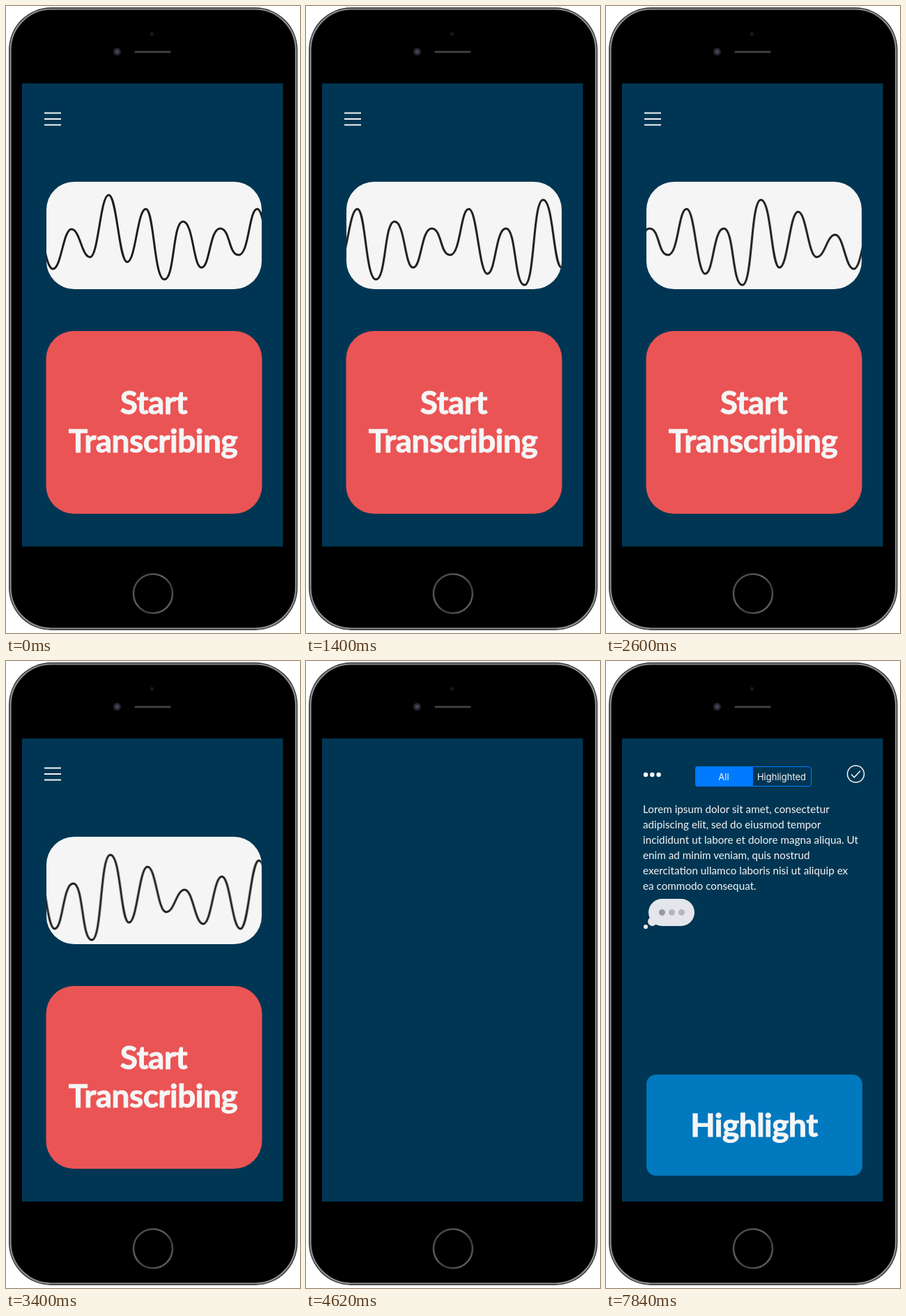
Write an HTML page that moves like this. It is 422 px wide and 899 px high and loops after 8000 ms.

```html
<!DOCTYPE html>
<html lang="en">
<head>
<meta charset="utf-8">
<title>Transcription app</title>
<style>
  html, body { margin: 0; width: 100%; height: 100%; overflow: hidden; background: #fff; }
  svg { display: block; }
  text { fill: #f5f5f5; }
  .label {
    font: 700 46px Lato, "Open Sans", sans-serif; letter-spacing: -.5px; text-anchor: middle;
    stroke: #f5f5f5; stroke-width: 1px;
  }
  .body { font: 15.25px Lato, "Open Sans", sans-serif; }
  .tab { font: 13px Inter, Roboto, sans-serif; text-anchor: middle; }

  .home, .notes, .wave, .more, .bubble { animation: 8s -2ms infinite; }
  .home { animation-name: leave; }
  .notes { animation-name: enter; }
  .wave { animation-name: scroll; }
  .more { animation-name: reveal; animation-timing-function: step-end; }
  .bubble { animation-name: drop; animation-timing-function: step-end; }

  @keyframes leave {
    0% { opacity: 1; }
    47.5% { opacity: 1; animation-timing-function: steps(5, end); }
    53.75%, 100% { opacity: 0; }
  }
  @keyframes enter {
    0% { opacity: 0; }
    60.125% { opacity: 0; animation-timing-function: steps(5, end); }
    66.375%, 100% { opacity: 1; }
  }
  /* one step per 100 ms, with a skipped step at 2 s */
  @keyframes scroll {
    0% { transform: translateX(0); animation-timing-function: steps(20, end); }
    24.9999% { transform: translateX(-181.4px); }
    25% { transform: translateX(-190.5px); animation-timing-function: steps(25, end); }
    56.25%, 100% { transform: translateX(-417.2px); }
  }
  @keyframes reveal {
    0% { fill-opacity: 0; }
    93.875%, 100% { fill-opacity: 1; }
  }
  @keyframes drop {
    0% { transform: translateY(0); }
    93.875%, 100% { transform: translateY(64px); }
  }
</style>
</head>
<body>
<svg width="422" height="899" viewBox="0 0 422 899">
  <defs>
    <clipPath id="card"><rect x="58" y="252" width="309" height="154" rx="40"/></clipPath>
    <linearGradient id="ring" x1="0" y1="0" x2="1" y2="1">
      <stop offset="0" stop-color="#3c3d42"/>
      <stop offset=".4" stop-color="#5c5d63"/>
      <stop offset=".65" stop-color="#38393d"/>
      <stop offset="1" stop-color="#707178"/>
    </linearGradient>
  </defs>

  <!-- phone -->
  <rect x="4" y="2" width="414.500" height="893" rx="61" fill="#303132"/>
  <rect x="6.500" y="4.500" width="409.500" height="888" rx="58.500" stroke="#8b8d8e" stroke-width="2.200"/>
  <circle cx="209.500" cy="40" r="2.800" fill="#17171a"/>
  <circle cx="159.500" cy="65.500" r="5.500" fill="#24242e"/>
  <circle cx="159.500" cy="65.500" r="2.800" fill="#424258"/>
  <rect x="184" y="64" width="53" height="3.600" rx="1.800" fill="#242426"/>
  <rect x="185" y="65.200" width="51" height="1.300" rx=".6" fill="#545456"/>
  <circle cx="211" cy="842.500" r="28" fill="none" stroke="url(#ring)" stroke-width="2.600"/>
  <rect x="23" y="111" width="374.500" height="664" fill="#003653"/>

  <g class="home">
    <path d="M55 153.500h24M55 162h24M55 170.500h24" stroke="#f5f5f5" stroke-width="2"/>
    <rect x="58" y="252" width="309" height="154" rx="40" fill="#f5f5f5"/>
    <g clip-path="url(#card)">
      <path class="wave" fill="none" stroke="#1e1e1e" stroke-width="3"/>
    </g>
    <rect x="57.500" y="466" width="310" height="262" rx="40" fill="#ea5455"/>
    <text class="label" x="212" y="584.500">Start</text>
    <text class="label" x="211" y="639.500">Transcribing</text>
  </g>

  <g class="notes">
    <g fill="#fff">
      <circle cx="57" cy="163" r="3.200"/>
      <circle cx="66.300" cy="163" r="3.200"/>
      <circle cx="75.600" cy="163" r="3.200"/>
    </g>
    <rect x="128.500" y="151.500" width="166" height="28" rx="3.500" fill="none" stroke="#007aff"/>
    <path d="M211 151v29h-79a4 4 0 0 1-4-4v-21a4 4 0 0 1 4-4z" fill="#007aff"/>
    <text class="tab" x="169" y="171">All</text>
    <text class="tab" x="252" y="171">Highlighted</text>
    <g fill="none" stroke="#f5f5f5" stroke-width="1.500">
      <circle cx="358.500" cy="162" r="12"/>
      <path d="M352 162.500l4.300 4.300 8.700-9.300"/>
    </g>
    <g class="body">
      <text x="53" y="218">Lorem ipsum dolor sit amet, consectetur</text>
      <text x="53" y="240">adipiscing elit, sed do eiusmod tempor</text>
      <text x="53" y="262">incididunt ut labore et dolore magna aliqua.<tspan class="more"> Ut</tspan></text>
      <g class="more">
        <text x="53" y="284">enim ad minim veniam, quis nostrud</text>
        <text x="53" y="306">exercitation ullamco laboris nisi ut aliquip ex</text>
        <text x="53" y="328">ea commodo consequat.</text>
      </g>
    </g>
    <g class="bubble">
      <g fill="#e5e6eb">
        <rect x="61" y="277" width="66" height="39" rx="19.500"/>
        <circle cx="66.500" cy="309.500" r="6.500"/>
        <circle cx="57" cy="317" r="3.100"/>
      </g>
      <circle cx="80.500" cy="296.500" r="4.500" fill="#98989d"/>
      <circle cx="94.500" cy="296.500" r="4.500" fill="#b5b5ba"/>
      <circle cx="108.500" cy="296.500" r="4.500" fill="#b5b5ba"/>
    </g>
    <rect x="58" y="593" width="310" height="145" rx="14" fill="#0079bf"/>
    <text class="label" x="212.500" y="681.500">Highlight</text>
  </g>
</svg>
<script>
  // Heights of alternating crests and troughs, evenly spaced.
  const heights = [
    310, 377, 320, 360, 271, 367, 291, 392, 309, 375, 319, 357, 291, 384, 319,
    400, 278, 375, 295, 360, 328, 377, 309, 384, 286, 372, 319, 385, 320
  ];
  const gap = 26.66, start = 40.7;
  const broad = new Set([7, 8, 10, 11, 14, 15, 16]);
  const xAt = i => start + gap * i;
  const bend = i => broad.has(i) ? 15 : 12;

  const path = heights.map((y, i) => {
    const x = xAt(i);
    return i
      ? `C${xAt(i - 1) + bend(i - 1)} ${heights[i - 1]} ${x - bend(i)} ${y} ${x} ${y}`
      : `M${x} ${y}`;
  }).join("");
  document.querySelector(".wave").setAttribute("d", path);
</script>
</body>
</html>
```
